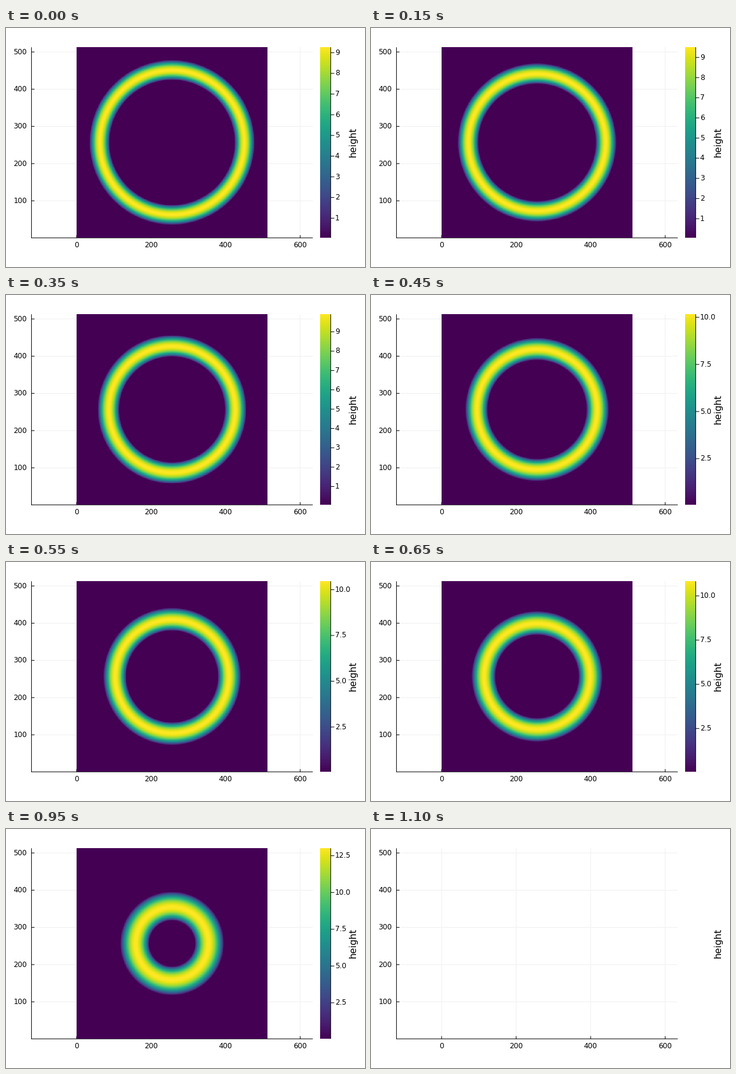
Animation of 600x400 px, one loop 4.95 s. Source, as a matplotlib script:

```python
import numpy as np
import matplotlib.pyplot as plt
from matplotlib.animation import FuncAnimation

W, H, DPI = 600, 400, 100
FRAMES, STEP = 99, 50
RING_FRAMES = 22
X0, SCALE = 118.0, 0.6228
LEFT, RIGHT, TOP, BOTTOM = 42.6, 512.7, 32.3, 351.2
BAR_L, BAR_R = RIGHT + 12, RIGHT + 30
FLOOR = 0.05

plt.rcParams["font.family"] = "DejaVu Sans"
fig = plt.figure(figsize=(W / DPI, H / DPI), dpi=DPI, facecolor="white")
ax = fig.add_axes([0, 0, 1, 1])


def text(x, y, s, px=12, **kw):
    return ax.text(x, y, s, fontsize=px * 72 / DPI, color="black", **kw)


def line(xs, ys, color="black", z=2):
    return ax.plot(xs, ys, color=color, lw=0.72, zorder=z, snap=False,
                   solid_capstyle="butt")[0]


def px_x(v):
    return X0 + SCALE * v


def px_y(v):
    return BOTTOM - SCALE * (v - 0.5)


# axes, grid and tick labels
for v in range(0, 601, 200):
    x = px_x(v)
    line([x, x], [TOP, BOTTOM], "0.94", 1)
    line([x, x], [BOTTOM - 4.5, BOTTOM])
    text(x, 363.5, str(v), ha="center", va="center")
for v in range(100, 501, 100):
    y = px_y(v)
    line([LEFT, RIGHT], [y, y], "0.94", 1)
    line([LEFT, LEFT + 5], [y, y])
    text(35, y + 0.2, str(v), ha="right", va="center")
line([LEFT, LEFT], [TOP, BOTTOM + 0.5])
line([LEFT, RIGHT], [BOTTOM, BOTTOM])
text(580.5, 191.3, "height", 15.7, rotation=90, ha="center", va="center")

# film height on a 512 x 512 grid
axis = np.arange(1, 513) - 256.5
radius = np.maximum(np.hypot(axis[:, None], axis[None, :]), 1)
film = ax.imshow(np.zeros((512, 512)), cmap="viridis", vmin=0, vmax=1,
                 extent=(px_x(0.5), px_x(512.5), BOTTOM, TOP),
                 interpolation="nearest", zorder=3)
bar = ax.imshow(np.linspace(1, 0, 256)[:, None], cmap="viridis",
                extent=(BAR_L, BAR_R, BOTTOM, TOP), interpolation="nearest",
                zorder=3)
bar_line = line([BAR_R, BAR_R], [TOP, BOTTOM], z=4)
marks = [(line([BAR_R, BAR_R + 6], [0, 0], z=4),
          text(549.8, 0, "", ha="left", va="center")) for _ in range(10)]

ax.set_xlim(0, W)
ax.set_ylim(H, 0)
ax.set_aspect("auto")
ax.axis("off")


def ring(i):
    """Mean radius, half width and peak height of the closing ring."""
    shrink = (1 - i / 22.4) ** 0.351
    return 194.5 * shrink, 27.2 * shrink ** -0.55, 9.26 * shrink ** -0.513


def profile(mid, half, peak):
    """Constant-curvature cap between the two contact lines."""
    a, b = mid - half, mid + half
    crest2 = (b * b - a * a) / (2 * np.log(b / a))

    def cap(r):
        return 2 * crest2 * np.log(r / a) - (r * r - a * a)

    return np.maximum(peak * cap(radius) / cap(np.sqrt(crest2)), FLOOR)


def draw(i):
    on = i < RING_FRAMES
    for art in (film, bar, bar_line):
        art.set_visible(on)
    for tick, label in marks:
        tick.set_visible(False)
        label.set_visible(False)
    if not on:
        return []
    mid, half, peak = ring(i)
    film.set_data((profile(mid, half, peak) - FLOOR) / (peak - FLOOR))
    gap, form = (1, "{:.0f}") if peak < 10 else (2.5, "{:.1f}")
    for v, (tick, label) in zip(np.arange(gap, peak, gap), marks):
        y = BOTTOM - (BOTTOM - TOP) * (v - FLOOR) / (peak - FLOOR)
        tick.set_ydata([y, y])
        label.set_y(y)
        label.set_text(form.format(v))
        tick.set_visible(True)
        label.set_visible(True)
    return []


anim = FuncAnimation(fig, draw, frames=FRAMES, interval=STEP, repeat=True,
                     repeat_delay=0, init_func=lambda: draw(0), blit=False)
plt.show()
```
